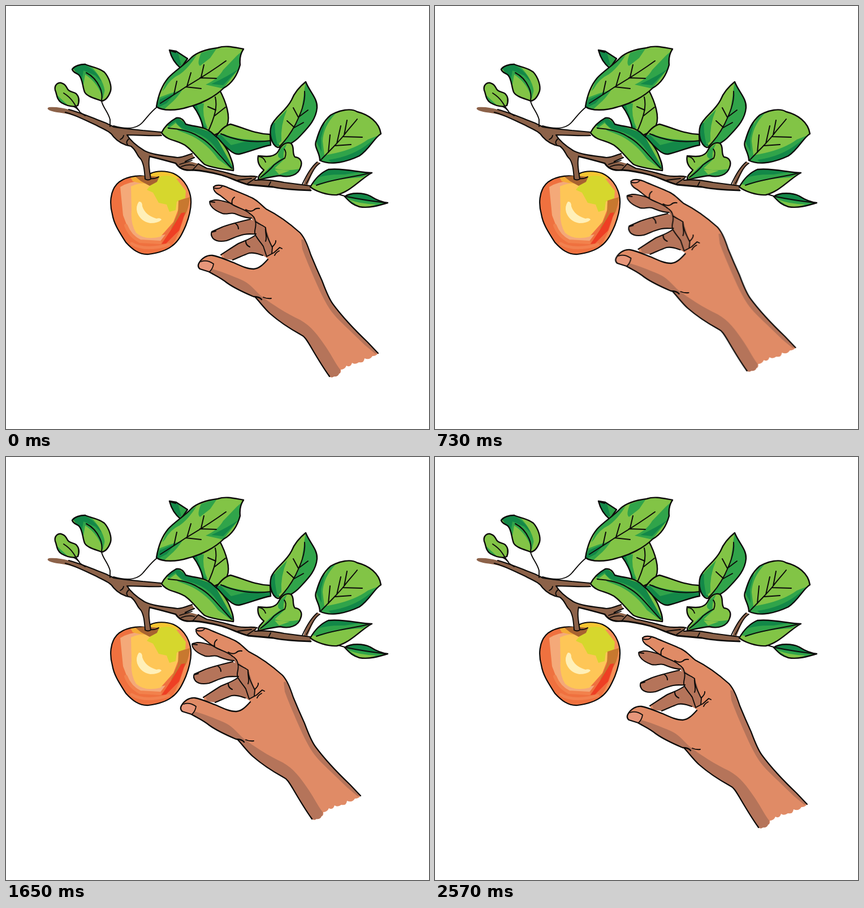
An HTML page that plays this animation: 748 px wide and 748 px high, repeating every 2800 ms.

```html
<!DOCTYPE html>
<html lang="en">
<head>
<meta charset="utf-8">
<title>Picking an apple</title>
<style>
  html, body { margin: 0; width: 100%; height: 100%; overflow: hidden; background: #fff; }
  svg { display: block; width: 100%; height: 100%; }
  path { fill: none; stroke-linecap: round; stroke-linejoin: round; }
</style>
</head>
<body>
<svg id="stage" viewBox="0 0 748 748"></svg>
<script>
const NS = 'http://www.w3.org/2000/svg';
const stage = document.getElementById('stage');
const INK = '#0d0b0a', LIGHT = '#82c446', MID = '#30a44a', DARK = '#138848';
const SKIN = '#e08b66', SHADE = '#b5745a', BARK = '#8c6249';

function add(parent, tag, attrs = {}) {
  const el = document.createElementNS(NS, tag);
  for (const key in attrs) el.setAttribute(key, attrs[key]);
  return parent.appendChild(el);
}
const fill = (g, color, d) => add(g, 'path', { d, style: `fill:${color}` });
const line = (g, d, width = 2, color = INK) => add(g, 'path', { d, stroke: color, 'stroke-width': width });

// A closed shape with colour patches kept inside its outline.
let clips = 0;
function shape(g, base, outline, patches, width = 2.2) {
  const id = 'clip' + clips++;
  add(add(g, 'clipPath', { id }), 'path', { d: outline });
  fill(g, base, outline);
  const inner = add(g, 'g', { 'clip-path': `url(#${id})` });
  for (const [color, d, stroke] of patches) stroke ? line(inner, d, stroke, color) : fill(inner, color, d);
  if (width) line(g, outline, width);
}
function leaf(outline, patches, veins, base = LIGHT) {
  shape(tree, base, outline, patches, 2.4);
  line(tree, veins, 2);
}

const hand = add(stage, 'g');
const tree = add(stage, 'g');

// Hand: far fingers
const middle = 'M398 349C388 346 378 342 369 343L361 345Q359 349 363 354C367 360 375 364 383 367C391 369 397 365 404 367C415 371 422 375 434 375L440 364Z';
const ring = 'M432 377C415 381 394 386 382 391L364 399Q361 404 366 411C371 416 380 417 390 415C401 411 410 406 421 404C432 402 436 404 442 403L452 388Z';
const little = 'M440 406C430 413 420 416 411 420C401 426 391 433 380 440L383 447L401 449C411 445 421 440 430 437C441 435 449 440 454 441L466 448L466 420Z';
for (const finger of [little, ring, middle]) fill(hand, SHADE, finger);
fill(hand, SHADE, 'M430 366L444 376L464 394L478 430L461 446L455 424L440 404L442 390L434 375Z');
fill(hand, SKIN, 'M380 440L383 437L386 444L383 447Z');

// Hand: palm, index finger, thumb and forearm
const back = 'M367 320C372 315 382 317 390 320C403 326 417 331 430 337C444 342 450 351 460 359C480 369 501 384 520 401C529 411 534 425 539 440C546 457 553 473 559 486C565 502 570 516 578 527C598 554 619 575 639 594L658 614';
const forearm = 'M572 655C559 637 548 618 538 601C532 591 528 584 521 581C501 570 483 558 467 544C458 536 450 525 441 515';
const palm = back +
  'Q655 619 648 619Q643 627 634 623Q633 632 624 630Q617 635 612 631Q609 640 602 636Q599 643 592 643Q593 649 589 650Q587 656 580 655Q576 658 572 655' +
  'C559 637 548 618 538 601C532 591 528 584 521 581C501 570 483 558 467 544C458 536 450 525 441 515' +
  'C426 509 406 500 390 489C379 480 367 475 359 470L343 465Q338 461 341 455C346 446 355 440 365 441C378 443 391 450 403 454C414 459 426 465 438 465C448 464 455 457 463 448L461 443L470 438L471 427C467 416 464 402 459 392L444 380L431 367C424 360 413 358 402 352C393 348 384 338 377 334Q366 328 367 320Z';
shape(hand, SKIN, palm, [
  [SHADE, 'M522 413Q530 409 539 440L578 524L660 612L653 615L635 600L606 572C590 557 577 544 570 532C562 519 554 502 547 486C538 465 529 444 524 430Z'],
  [SHADE, 'M360 475L364 465C381 469 399 477 416 484C430 490 439 501 449 511C468 526 496 544 520 555C540 566 552 583 563 599C574 614 581 630 591 643L590 660H565L515 585L440 520Z'],
  ['#ec9a84', 'M367 322Q377 313 384 319Q379 324 370 323Z'],
  ['#e7967a', 'M340 459L345 452Q355 448 367 456L360 470L344 466Z']
], 0);

line(hand, back, 2.2);
line(hand, forearm, 2.3);
line(hand, 'M452 519Q448 514 438 514C424 508 405 500 390 489C379 480 367 475 359 470L343 465Q338 461 341 455C346 446 355 440 365 441C378 443 391 450 403 454C414 459 426 465 438 465C448 464 455 457 463 448', 2.3);
line(hand, 'M367 320Q366 328 377 334C384 338 393 348 402 352C413 358 424 360 431 367M400 351Q398 342 404 338M424 360Q432 365 438 361Q442 357 448 358M369 322Q378 324 382 319', 2);
line(hand, 'M398 349C388 346 378 342 369 343L361 345Q359 349 363 354C367 360 375 364 383 367C391 369 397 365 404 367C415 371 422 375 434 375M360 346L369 347', 2);
line(hand, 'M432 377C415 381 394 386 382 391L364 399Q361 404 366 411C371 416 380 417 390 415C401 411 410 406 421 404C432 402 436 404 442 403M364 400L371 398M405 384Q411 388 411 394', 2.1);
line(hand, 'M380 440C391 433 401 426 411 420C420 416 430 413 440 406M401 449C411 445 421 440 430 437C441 435 449 440 454 441M424 416Q424 423 431 426', 2.1);
line(hand, 'M431 367Q440 372 441 381C444 390 437 398 441 405C446 414 452 420 455 425M441 381C449 387 455 388 459 392C459 402 463 411 471 427L470 438M459 392C458 400 462 410 459 416M455 425L461 443L474 436L484 427L488 429M471 426Q478 419 477 415M483 433Q477 436 475 441', 1.9);
line(hand, 'M455 515Q462 518 469 517M345 452Q355 448 367 456Q366 464 360 470', 1.8);

// Branch
const bark = 'M76 179C88 178 99 180 111 183C130 188 146 195 164 202C176 206 184 210 191 214C208 217 225 218 242 220L274 223L275 229C255 230 235 228 214 228C221 240 232 248 245 256C262 264 284 265 303 268C313 268 322 263 329 261L333 268L317 275C329 275 341 278 355 287C375 290 393 296 410 300C424 303 433 299 444 302L440 308C459 306 476 309 492 312L538 318L539 326C517 325 495 325 472 320L428 316C413 312 398 304 381 299C363 294 348 291 330 290C316 292 306 287 300 278C285 274 271 270 254 266C251 277 254 292 255 306Q250 309 246 306C245 292 244 279 238 270C231 265 231 255 221 248C208 246 197 239 190 231C185 222 173 218 160 211C144 204 127 195 109 191C96 188 83 188 76 184Q71 181 76 179Z';
fill(tree, BARK, 'M526 316C530 302 538 285 551 275L555 278C545 286 540 300 533 317Z');
line(tree, 'M524 315C530 302 538 286 550 276M531 314C539 300 544 285 555 278', 1.8);
fill(tree, BARK, bark);
line(tree, 'M111 183C130 188 146 195 164 202C176 206 184 210 191 214C208 217 225 218 242 220L274 223M275 229C255 230 235 228 214 228C221 240 232 248 245 256C262 264 284 265 303 268C313 268 322 263 329 261M105 188C122 192 144 204 160 211C173 218 185 222 190 231C197 239 208 246 221 248C231 255 231 265 238 270', 2.2);
line(tree, 'M254 266C271 270 285 274 300 278C306 287 316 292 330 290C348 291 363 294 381 299C398 304 413 312 428 316L472 320C495 325 517 325 539 326', 2.8);
line(tree, 'M333 268L317 275M340 279L355 287C375 290 393 296 410 300C424 303 433 299 444 302M440 308C459 306 476 309 492 312L538 318', 2.2);
line(tree, 'M202 236Q207 234 208 229M215 245Q211 241 217 235M307 280L329 273M310 284Q322 279 333 282M330 290L340 279M410 308L434 305M427 314L442 304M468 311L464 319', 1.8);

// Leaf stalks
line(tree, 'M169 168C171 179 181 188 184 201L184 213M116 176Q128 181 131 188L140 194M268 178C257 186 251 195 243 204C232 218 211 218 190 212M588 333L602 337', 1.9);

// Leaves, far to near
leaf('M100 137C92 133 85 140 87 149C90 155 89 165 98 171C107 176 118 180 127 176C130 168 129 160 124 155C119 151 113 153 109 147C106 141 104 138 100 137Z',
  [[MID, 'M88 155L96 163L108 174L96 175Z']], 'M102 154Q113 161 119 170L128 184');
leaf('M117 112C121 106 131 103 140 103C150 108 163 108 174 117C183 127 187 142 185 150C182 159 177 167 169 168C156 163 143 160 139 152C135 142 136 130 129 122C124 118 119 118 117 112Z',
  [[MID, 'M117 100L146 101Q178 122 177 140L171 165Q165 138 140 121L136 145Z'], [DARK, 'M114 104L140 104Q163 117 169 134L158 123L137 114L134 132Z'], [LIGHT, 'M148 104L190 116V150L175 163Q178 134 148 104Z']],
  'M142 118C154 124 161 133 166 144Q171 154 169 167');
leaf('M289 78L301 80L321 93L309 110Q294 98 289 78Z',
  [[DARK, 'M285 74L303 78L310 105L300 104Z']], 'M290 79L300 82', MID);
leaf('M331 177C338 186 346 201 348 214C351 225 356 230 361 232C372 225 388 223 391 211C397 196 390 171 377 147L340 167Z',
  [[DARK, 'M326 174L347 172Q342 193 352 208L360 232L346 220Z'], [MID, 'M337 174L350 172Q346 194 357 217L350 211Z']],
  'M370 161C374 177 370 195 356 225M369 194L388 179M371 184L357 178');
leaf('M420 76C403 73 389 69 374 74C358 76 339 81 328 91C315 105 299 114 287 127C276 140 269 159 266 178C276 186 303 185 321 179C346 173 370 160 385 145C401 136 410 119 414 104C413 95 414 85 420 76Z',
  [[MID, 'M264 184L270 162Q290 154 312 148Q304 160 296 168L276 186Z'], [DARK, 'M264 182L272 165L300 153L284 172Z'],
   [MID, 'M424 74L414 108L384 146L353 139Q375 129 384 113L408 88Z'], [DARK, 'M412 111L384 140L363 138Q393 124 412 111Z'],
   [MID, 'M276 151L287 125L320 97L337 87Q322 111 307 121Q291 128 281 146Z'], [MID, 'M345 83L374 73L361 92L343 106Q337 102 345 83Z']],
  'M273 172C292 160 306 151 318 143C345 127 363 116 389 97M297 156L302 133M320 142L327 118M345 126L350 104M318 143L345 146M343 127L372 128');
leaf('M369 233C378 222 385 212 397 209C417 214 438 226 467 227L468 246C450 249 431 258 412 262C397 263 386 242 369 233Z',
  [[DARK, 'M365 230L385 226Q406 238 470 238V250L412 266Z'], [MID, 'M377 225Q404 236 430 238L398 246Z']],
  'M380 226C404 237 436 243 468 238');
leaf('M275 224C280 214 290 204 301 198C309 196 314 201 318 209C334 214 351 212 366 226C379 236 391 251 396 265C400 275 403 283 402 291C388 289 365 287 351 280C341 272 331 257 319 248C305 237 285 239 275 224Z',
  [[DARK, 'M284 211L302 196L318 208L368 225L405 292L377 268Q360 233 331 225Q306 220 284 211Z'], [MID, 'M284 215L300 204Q305 217 332 223Q355 231 368 247L398 288L375 271Q356 244 329 230Q304 219 284 215Z'], [LIGHT, 'M280 222L300 207L311 218L293 222Z']],
  'M287 216C306 217 328 222 341 231C364 243 379 267 399 287');
leaf('M530 134C537 152 551 163 550 180C548 202 533 216 520 230C510 241 494 250 480 250C469 245 465 226 469 212C476 195 495 186 505 166C511 151 520 142 530 134Z',
  [[MID, 'M530 132L553 172L549 202L515 239L480 253Q510 224 522 187Z'], [DARK, 'M467 211L482 202Q474 222 484 248L470 247Z'], [MID, 'M476 204L497 183Q485 211 487 239L480 245Q474 222 476 204Z']],
  'M528 151C530 173 518 196 512 209Q500 232 484 248M517 197L508 180M509 214L497 203M518 196L534 184M508 216L526 206');
leaf('M446 265C458 266 475 269 482 256C487 246 495 239 504 243C511 249 505 260 511 267C520 268 525 275 521 285C517 299 501 304 485 300C470 301 455 306 446 307C445 299 453 295 456 290C448 284 444 275 446 265Z',
  [[MID, 'M444 308Q466 283 486 270Q476 266 486 252L497 243Q488 261 492 271L475 287Q492 293 520 288L511 304H450Z'], [LIGHT, 'M475 289L502 291L483 298Z']],
  'M450 303Q465 292 474 281Q486 272 493 269M493 269Q497 258 492 253M447 266Q456 267 459 276');
leaf('M555 273C555 258 543 249 549 237C554 220 560 205 574 193C589 184 610 180 621 187C641 192 660 205 663 226C651 233 643 253 625 265C604 275 575 283 555 273Z',
  [[MID, 'M552 276L548 233L575 191L583 190Q561 213 560 239L563 264Q613 256 640 236L666 226L625 270L582 284Z'], [DARK, 'M548 238L565 202L557 234L558 258Z'], [DARK, 'M570 272Q617 266 650 236L625 268L582 282Z']],
  'M556 273C571 257 587 242 598 228C607 216 615 208 621 200M570 259L573 228M585 243L592 212M598 228L603 202M582 247L610 245M596 231L630 232');
leaf('M538 320C546 306 556 295 570 289C598 286 625 295 647 295C630 303 610 328 585 334C569 335 548 328 538 320Z',
  [[MID, 'M540 315L557 293L650 292L630 303Q586 305 553 317Z'], [DARK, 'M549 304L568 287L630 293L599 298Q571 297 549 304Z']],
  'M549 317C578 306 607 304 641 296');
leaf('M599 337C610 329 632 330 644 336C655 343 665 347 675 348C659 353 641 358 625 355C611 351 606 344 599 337Z',
  [[DARK, 'M598 336L618 328L674 348Q642 348 600 338Z'], [LIGHT, 'M606 342Q625 350 655 351L630 358Z']],
  'M602 337Q632 343 671 348', MID);

// Apple
const skin = 'M246 301C231 299 208 302 196 315C184 328 183 350 188 368C191 387 202 402 212 418C223 430 235 440 252 439C268 437 283 433 294 424C306 415 312 402 318 388C325 370 329 350 326 335C322 317 311 303 296 296C283 291 266 291 256 296Z';
shape(tree, '#ef713f', skin, [
  ['#f58f56', 'M285 293Q330 301 330 350Q314 412 293 425Q323 374 316 334Z'],
  ['#f4a979', 'M202 320Q224 307 250 311L252 410L282 404L272 417L238 415L218 399L207 370Z'],
  ['#fec657', 'M221 319Q250 305 288 325L310 346L296 382L273 408Q245 415 230 401Q220 386 222 360Z'],
  ['#f4ac36', 'M218 299L240 304L274 303Q255 320 224 310Z'],
  ['#f6c632', 'M250 291L294 291L307 305L279 306L259 321L247 310Z'],
  ['#d6d72d', 'M267 304Q283 296 300 304L318 327L317 340L302 346L300 361L289 364L284 351L270 348L260 330L249 325Z'],
  ['#c8782f', 'M305 344L325 338Q323 365 310 378L291 395L304 367Z'],
  ['#ee3f24', 'M310 366L317 365L306 397L283 420L275 421L291 397Z'],
  ['#f2814c', 'M212 388Q219 407 237 416L272 418', 6],
  ['#f2814f', 'M222 420Q246 434 288 422', 5]
], 2.2);
fill(tree, '#fff0b8', 'M235 346Q229 354 232 365Q238 381 255 384Q269 384 275 378Q273 374 266 376Q246 370 241 354Q241 345 235 346Z');
fill(tree, '#a86330', 'M229 302L246 300L256 301L271 302L267 311L254 318L239 310Z');
fill(tree, BARK, 'M238 262L254 266C251 278 254 292 256 306Q251 309 246 306C245 292 245 279 238 270Z');
line(tree, 'M238 270C244 279 245 292 246 306Q251 309 256 306C254 292 251 278 254 266M256 305Q264 306 270 302', 2);

// The hand reaches in and draws back in held poses: start time, x, y
const LOOP = 2800;
const poses = [
  [0, 0, 0], [230, -4, -3], [460, -12, -6], [730, -20.5, -10], [960, -31, -15], [1190, -44, -23],
  [1650, -31, -15], [1880, -20.5, -10], [2110, -12, -6], [2340, -4, -3], [2570, 0, 0], [LOOP, 0, 0]
];
hand.animate(poses.map(([time, x, y]) => ({
  offset: time / LOOP, transform: `translate(${x}px, ${y}px)`, easing: 'step-end'
})), { duration: LOOP, iterations: Infinity });
</script>
</body>
</html>
```
